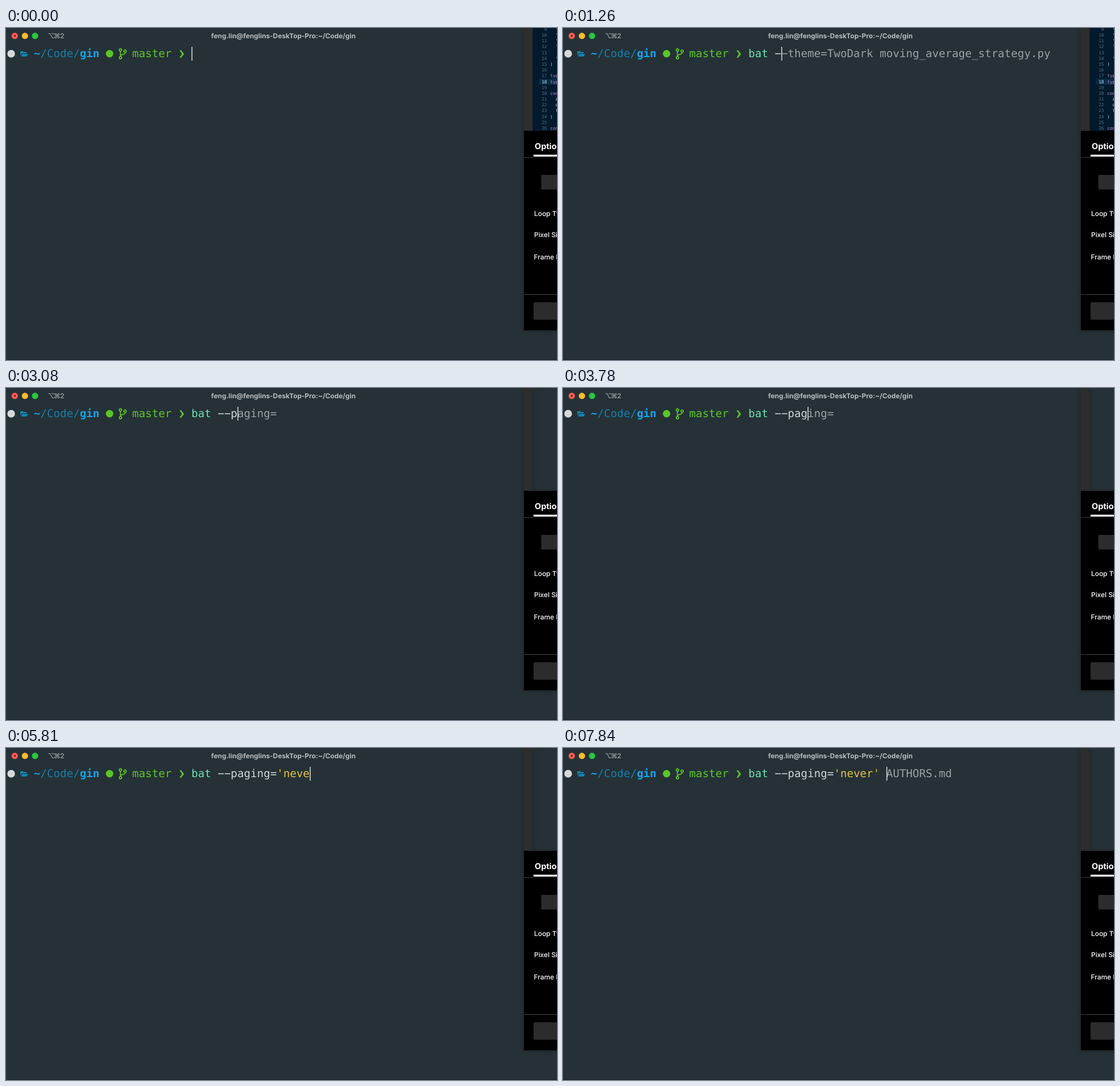
These frames come from a looping animation (963x581 px, 8 s). An HTML page:

```html
<!DOCTYPE html>
<html lang="en">
<head>
<meta charset="utf-8">
<title>Terminal</title>
<style>
  html, body { margin: 0; width: 100%; height: 100%; overflow: hidden; background: #253136; }
  svg { display: block; width: 963px; height: 581px; }
  text { white-space: pre; text-rendering: geometricPrecision; }
  .ui { font-family: Inter, Roboto, sans-serif; }
  .term { font: 19.07px "DejaVu Sans Mono", "Liberation Mono", monospace; }
  .code { font: 7.7px "DejaVu Sans Mono", "Liberation Mono", monospace; }
  .label { font-size: 11.9px; font-weight: 500; fill: #fff; }
  .panel { filter: drop-shadow(0 2px 4px rgba(0, 0, 0, .22)); }
</style>
</head>
<body>
<svg viewBox="0 0 963 581">
  <rect width="963" height="581" fill="#253136"/>
  <rect y="580" width="963" height="1" fill="#1c2529"/>

  <!-- title bar -->
  <circle cx="15.3" cy="13.8" r="5.5" fill="#ff5f57"/>
  <circle cx="15.3" cy="13.8" r="1.8" fill="#7d1510"/>
  <circle cx="33.1" cy="13.8" r="5.5" fill="#febc2e"/>
  <circle cx="50.8" cy="13.8" r="5.5" fill="#28c840"/>
  <g class="ui" fill="#929a9d" font-weight="600">
    <text x="73 83.5 94.5" y="18" font-size="12">⌥⌘2</text>
    <text x="484.8" y="18" font-size="11.8" font-weight="700" fill="#b8bec0" text-anchor="middle">feng.lin@fenglins-DeskTop-Pro:~/Code/gin</text>
  </g>

  <!-- prompt -->
  <circle cx="9" cy="45" r="6.7" fill="#d6d9da"/>
  <path d="M25 48.5V41.5q0-1 1-1h3.5l1.5 1.5h4q1 0 1 1v1.2h-7.500q-1 0-1.500.9zM26 49.8l2.4-4q.3-.6 1-.6h8.6q.8 0 .4.7l-2.1 3.4q-.4.6-1 .6z" fill="#1583b4"/>
  <g class="term">
    <text x="48.5" y="51" fill="#1b9fe0" font-weight="700">~</text>
    <text x="60" y="51" fill="#1480ae">/Code/</text>
    <text x="128.9" y="51" fill="#1ba3e8" font-weight="700">gin</text>
    <text x="220.5" y="51" fill="#5cc62a">master</text>
  </g>
  <circle cx="181" cy="45" r="6.5" fill="#5cc62a"/>
  <g fill="none" stroke="#5cc62a" stroke-width="1.7">
    <circle cx="200" cy="38.5" r="2.1"/>
    <circle cx="208.2" cy="40.5" r="2.1"/>
    <circle cx="200" cy="52" r="2.1"/>
    <path d="M200 40.600v9.3M208.2 42.6q0 3.2-4 3.8t-4.2 3"/>
  </g>
  <path d="M303.3 39h2.9l5 6.5-5 6.5h-2.9l4.2-6.5z" fill="#5cc62a"/>

  <!-- command line -->
  <g class="term">
    <text id="cmd" y="51" fill="#6ee0b2"></text>
    <text id="opt" y="51" fill="#d0d6d8"></text>
    <text id="str" y="51" fill="#e6c23f"></text>
    <text id="hint" y="51" fill="#98a3a7"></text>
  </g>
  <rect id="caret" y="33" width="1.4" height="24" fill="#e6eaeb"/>

  <!-- windows at the right edge -->
  <g class="panel">
    <rect x="905" width="15.5" height="180" fill="#2d2d2d"/>
    <rect x="905" y="180" width="70" height="349" fill="#000"/>
  </g>
  <g id="editor" class="code">
    <rect x="920.5" width="43" height="180" fill="#021a2c"/>
    <rect x="932" y="89" width="31" height="10" fill="#0b2c45"/>
  </g>
  <g class="ui">
    <text x="924" y="212" font-size="14.5" font-weight="700" fill="#fff">Options</text>
    <rect x="922" y="221.7" width="41" height="3.3" fill="#fff"/>
    <rect x="905" y="226" width="58" height="1" fill="#3c3c3c"/>
    <rect x="935.5" y="257" width="40" height="25.6" fill="#2c2c2c"/>
    <text class="label" x="923" y="329">Loop Type</text>
    <text class="label" x="923" y="366">Pixel Size</text>
    <text class="label" x="922.5" y="405">Frame Rate</text>
    <rect x="905" y="466" width="58" height="1" fill="#444"/>
    <rect x="922" y="480" width="50" height="30.4" rx="1.5" fill="#2c2c2c"/>
  </g>
</svg>
<script>
const LOOP = 8000, CELL = 11.478, LEFT = 324;
const EDITOR_GONE = 2730;
const LINE = "bat --paging='never' ";
const FULL = "bat --theme=TwoDark moving_average_strategy.py";

// time at which each character of LINE is typed
const KEYS = [140, 350, 560, 840, 1260, 1400, 2730, 3640, 3780, 3990, 4130,
  4270, 4480, 4760, 5320, 5460, 5600, 5810, 6020, 6230, 7070];

const $ = id => document.getElementById(id);
const editor = $("editor");

function addCode(x, y, text, fill, anchor = "start") {
  const el = document.createElementNS("http://www.w3.org/2000/svg", "text");
  el.setAttribute("x", x);
  el.setAttribute("y", y);
  el.setAttribute("fill", fill);
  el.setAttribute("text-anchor", anchor);
  el.textContent = text;
  editor.append(el);
}

function buildEditor() {
  const rows = {
    9: "  '", 10: "  '", 11: "  '", 12: "  '", 14: "  '", 15: ")",
    17: "type", 18: "type", 20: "const", 21: "  abort", 22: "  default",
    23: "  flag", 24: ")", 26: "const"
  };
  for (let n = 9; n <= 26; n++) {
    const y = 15 + (n - 10) * 10.19;
    addCode(945.5, y, n, n === 18 ? "#c5e4fd" : "#587086", "end");
    const row = rows[n];
    if (row) {
      const color = /^[tc]/.test(row) ? "#b98ad8" : "#c3cfda";
      addCode(951, y, row, color);
    }
  }
}

function hintFor(n) {
  if (n > 0 && n <= 6) return FULL.slice(n);
  if (n > 6 && n < 13) return LINE.slice(n, 13);
  return n === LINE.length ? "AUTHORS.md" : "";
}

// the minus sign gives the terminal's wide dashes
function put(id, start, text) {
  $(id).setAttribute("x", LEFT + start * CELL);
  $(id).textContent = text.replace(/-/g, "\u2212");
}

let shown = -1;
function draw(t) {
  editor.style.display = t < EDITOR_GONE ? "" : "none";
  const n = KEYS.filter(k => k <= t).length;
  if (n === shown) return;
  shown = n;
  const typed = LINE.slice(0, n);
  put("cmd", 0, typed.slice(0, 3));
  put("opt", 3, typed.slice(3, 13));
  put("str", 13, typed.slice(13));
  put("hint", n, hintFor(n));
  $("caret").setAttribute("x", LEFT + n * CELL + 0.3);
}

buildEditor();
const start = performance.now();
function tick() {
  draw((performance.now() - start) % LOOP);
  requestAnimationFrame(tick);
}
tick();
</script>
</body>
</html>
```
